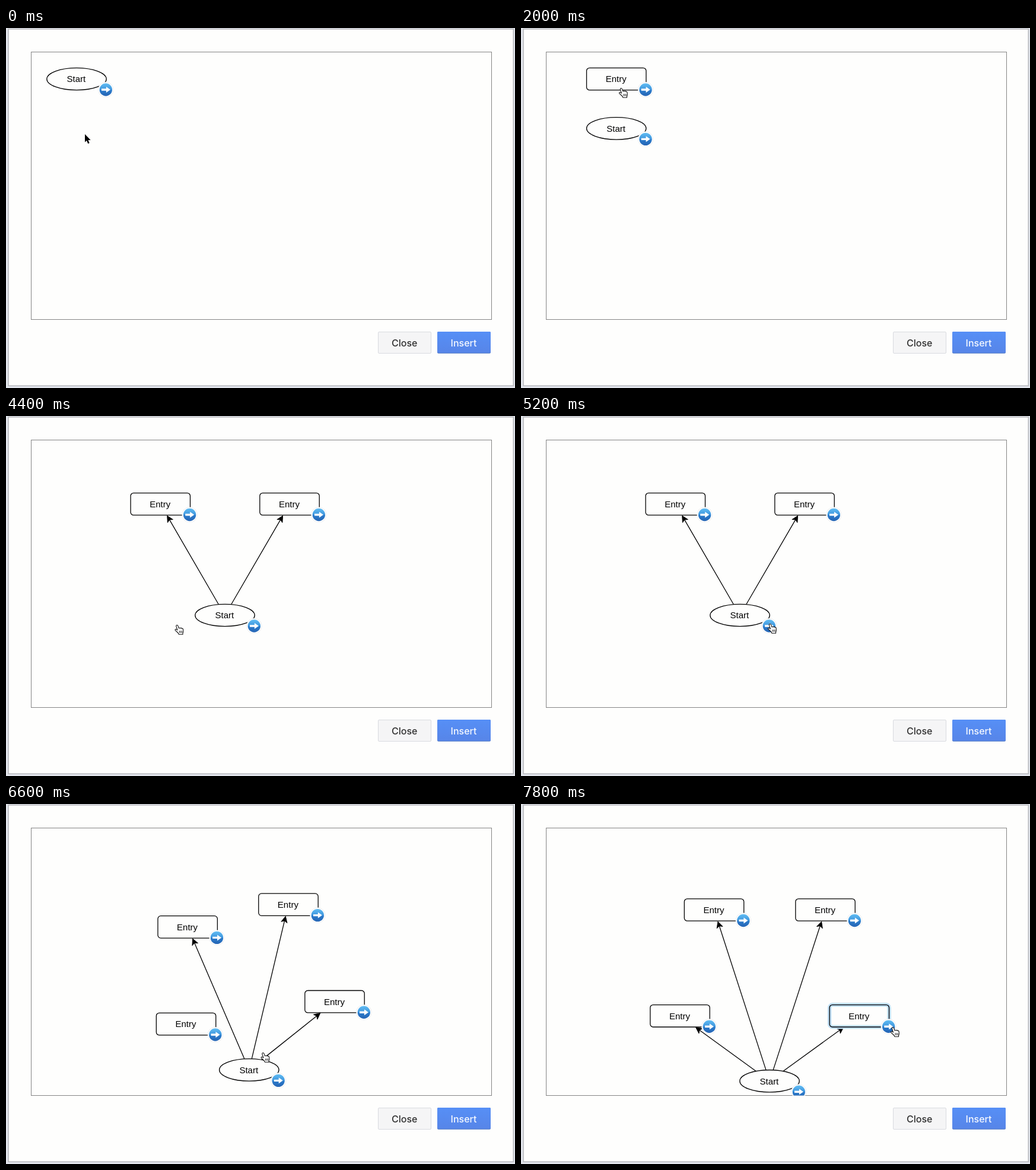
An HTML page that plays this animation: 858 px wide and 607 px high, repeating every 8 s.

```html
<!DOCTYPE html>
<html lang="en">
<head>
<meta charset="utf-8">
<title>Flowchart editor</title>
<style>
  html, body { margin: 0; width: 100%; height: 100%; overflow: hidden; background: #fefefd; }
  svg { display: block; width: 100%; height: 100%; }
  .line { fill: none; stroke: #000; stroke-width: 1.3; }
  .label { font: 15px "Liberation Sans", Arial, sans-serif; text-anchor: middle; }
  .button { font: 500 16px Inter, sans-serif; text-anchor: middle; }
</style>
</head>
<body>
<svg viewBox="0 0 858 607">
  <defs>
    <linearGradient id="ball" x2="0" y2="1">
      <stop offset="0" stop-color="#62bdf3"/>
      <stop offset=".48" stop-color="#3f97de"/>
      <stop offset=".55" stop-color="#2b7bcb"/>
      <stop offset="1" stop-color="#2665b4"/>
    </linearGradient>
    <linearGradient id="blue" x2="0" y2="1">
      <stop offset="0" stop-color="#568ff6"/>
      <stop offset="1" stop-color="#5785e8"/>
    </linearGradient>
    <clipPath id="view"><rect x="42" y="40" width="777" height="451.5"/></clipPath>
    <g id="next">
      <circle r="13" fill="#e9e9eb"/>
      <circle r="12.3" fill="#fff"/>
      <circle r="10.7" fill="url(#ball)"/>
      <path d="M-7.3-1.7H.6V-5L7.6 0 .6 5V1.7H-7.3Z" fill="#fff"/>
    </g>
  </defs>

  <rect width="858" height="607" fill="#e4e7ee"/>
  <rect x="4" y="1.7" width="851.3" height="601.6" fill="#fefefd" stroke="#b7b8bd" stroke-width="1.6"/>
  <rect x="42.5" y="40.5" width="776" height="451" fill="#fefefd" stroke="#858585"/>

  <rect x="627.5" y="512.5" width="89" height="36" rx="1.5" fill="#f5f5f6" stroke="#d9dbe0"/>
  <text class="button" x="671.7" y="536.5" fill="#303030">Close</text>
  <rect x="727" y="512" width="90" height="36.7" rx="2" fill="#4b75c4"/>
  <rect x="727" y="512" width="90" height="35.7" rx="2" fill="url(#blue)"/>
  <text class="button" x="771.5" y="536.5" fill="#f6f9ff">Insert</text>

  <g clip-path="url(#view)"><g id="edges"></g><g id="nodes"></g></g>

  <g id="cursor">
    <path data-kind="arrow" d="M0 0V13.6L3 10.8 5.2 16 7.7 15 5.5 9.9H9.7Z"
      fill="#000" stroke="#fff" stroke-width="1.1" stroke-linejoin="round" paint-order="stroke"/>
    <g data-kind="hand" stroke="#111" stroke-width="1.1" stroke-linejoin="round">
      <path fill="#fff" d="M-1.8 1.2Q-1.7-.5-.1-.5 1.2-.3 1.7 1.3L2.8 4.8Q4.1 3.7 5.3 4.8 6.8 3.9 7.8 5.2 9.6 4.8 10 6.5L10.4 9.8Q10.4 11.8 9.5 13.2V15.2H2.8Q2.5 13.5.8 12L-3 8.6Q-3.9 7.2-2.7 6.6-1.6 6.3.4 8Z"/>
      <path fill="none" stroke-width=".9" d="M4 9.2V12.8M6.1 9.2V12.8M8.2 9.2V12.8"/>
    </g>
    <path data-kind="move" d="M0-7 3-3.6H1V-1H3.6V-3L7 0 3.6 3V1H1V3.6H3L0 7-3 3.6H-1V1H-3.6V3L-7 0-3.6-3V-1H-1V-3.6H-3Z"
      fill="#000" stroke="#fff" stroke-width="1.6" paint-order="stroke"/>
  </g>
</svg>
<script>
const LOOP = 8000, RX = 50.2, RY = 18.7;
const STEP = 30, STEPS = 6;

// Node centres per layout: the start node first, then its entries.
const layouts = [
  { at: 0, nodes: [[119, 86]] },
  { at: 1985, nodes: [[244.2, 336], [244.2, 86]] },
  { at: 4050, nodes: [[369, 336], [478, 148.5], [260.3, 148.5]] },
  { at: 5240, nodes: [[388, 403.5], [515.3, 276], [388, 148.5], [260.3, 276]] },
  { at: 6525, nodes: [[419, 467.2], [570.3, 357.3], [513, 178.5], [325.5, 178.5], [268, 357.3]] }
];

// Pointer path: time, x, y, and the look it has from then on.
const path = [
  [0, 133, 179, 'arrow'], [500, 133, 179, 'arrow'], [1300, 165, 112, 'hand'],
  [1600, 169, 102, 'hand'], [2600, 169, 102, 'arrow'], [2800, 174, 85, 'arrow'],
  [3350, 262, 322, 'move'], [3600, 282, 340, 'move'], [3760, 288.5, 353, 'hand'],
  [4450, 288.5, 353, 'arrow'], [4900, 409, 358, 'hand'], [5100, 420, 351, 'hand'],
  [5350, 420, 351, 'arrow'], [5600, 423, 348.5, 'arrow'], [5950, 432, 411, 'hand'],
  [6150, 433.5, 420, 'hand'], [6750, 433.5, 420, 'arrow'], [7450, 612, 370, 'hand'],
  [7600, 627, 377, 'hand'], [LOOP, 627, 377, 'hand']
];

const byId = id => document.getElementById(id);
const mix = (a, b, k) => a + (b - a) * k;

function add(parent, tag, attrs, text = '') {
  const el = document.createElementNS('http://www.w3.org/2000/svg', tag);
  for (const key in attrs) el.setAttribute(key, attrs[key]);
  el.textContent = text;
  parent.append(el);
  return el;
}

function show(el, on) {
  el.setAttribute('visibility', on ? 'visible' : 'hidden');
}

function makeNode(i) {
  const root = add(byId('nodes'), 'g', {});
  const box = { x: -RX, y: -RY, width: 2 * RX, height: 2 * RY, rx: 5 };
  const [tag, shape] = i ? ['rect', box] : ['ellipse', { rx: RX, ry: RY }];
  add(root, tag, { ...shape, fill: '#fefefd' });
  const glow = add(root, tag, { ...shape, fill: 'none', stroke: '#bfdff6', 'stroke-width': 6.5 });
  add(root, tag, { ...shape, class: 'line' });
  add(root, 'text', { class: 'label', x: -.6, y: 5.4 }, i ? 'Entry' : 'Start');
  add(root, 'use', { href: '#next', x: 49.3, y: 18 });
  return { root, glow };
}

function makeEdge() {
  const root = add(byId('edges'), 'g', {});
  return {
    root,
    line: add(root, 'path', { class: 'line' }),
    head: add(root, 'path', { d: 'M0 0-10.5-5.2-7.9 0-10.5 5.2Z', stroke: '#000', 'stroke-width': .8 })
  };
}

const nodes = layouts.map((_, i) => makeNode(i));
const edges = layouts.slice(1).map(makeEdge);
const looks = [...document.querySelectorAll('[data-kind]')];

// Each step covers a third of the remaining way; new entries leave from the start node.
function pose(t) {
  const k = layouts.findLastIndex(l => t >= l.at);
  const { at, nodes: goal } = layouts[k];
  const n = 1 + Math.floor((t - at) / STEP);
  if (!k || n > STEPS) return { spots: goal, linked: k };
  const from = layouts[k - 1].nodes;
  const part = 1 - Math.pow(2 / 3, n);
  const spots = goal.map((g, i) => {
    const p = from[i] || from[0];
    return [mix(p[0], g[0], part), mix(p[1], g[1], part)];
  });
  return { spots, linked: k - 1 };
}

function pointer(t) {
  const i = path.findLastIndex(p => t >= p[0]);
  const a = path[i], b = path[i + 1] || a;
  const u = b === a ? 0 : (t - a[0]) / (b[0] - a[0]);
  return { x: mix(a[1], b[1], u), y: mix(a[2], b[2], u), kind: a[3] };
}

function drawEdge(edge, [ax, ay], [bx, by]) {
  const dx = bx - ax, dy = by - ay;
  const out = 1 / (Math.hypot(dx / RX, dy / RY) || 1);
  const back = Math.min(1, 1 / (Math.max(Math.abs(dx) / RX, Math.abs(dy) / RY) || 1));
  const len = Math.hypot(dx, dy) || 1;
  const tx = bx - dx * back - dx / len, ty = by - dy * back - dy / len;
  const ex = tx - dx / len * 7, ey = ty - dy / len * 7;
  edge.line.setAttribute('d', `M${ax + dx * out} ${ay + dy * out}L${ex} ${ey}`);
  const turn = Math.atan2(dy, dx) * 180 / Math.PI;
  edge.head.setAttribute('transform', `translate(${tx} ${ty}) rotate(${turn})`);
}

function draw(t) {
  const { spots, linked } = pose(t);
  const tip = pointer(t);
  nodes.forEach(({ root, glow }, i) => {
    const spot = spots[i];
    root.setAttribute('display', spot ? 'inline' : 'none');
    if (!spot) return;
    const [x, y] = spot;
    root.setAttribute('transform', `translate(${x} ${y})`);
    show(glow, i > 0 && Math.hypot(tip.x - x - 49.3, tip.y - y - 18) < 12);
  });
  edges.forEach((edge, i) => {
    show(edge.root, i < linked);
    if (i < linked) drawEdge(edge, spots[0], spots[i + 1]);
  });
  byId('cursor').setAttribute('transform', `translate(${tip.x} ${tip.y})`);
  looks.forEach(el => show(el, el.dataset.kind === tip.kind));
}

const begin = performance.now();
function tick() {
  draw((performance.now() - begin) % LOOP);
  requestAnimationFrame(tick);
}
tick();
</script>
</body>
</html>
```
